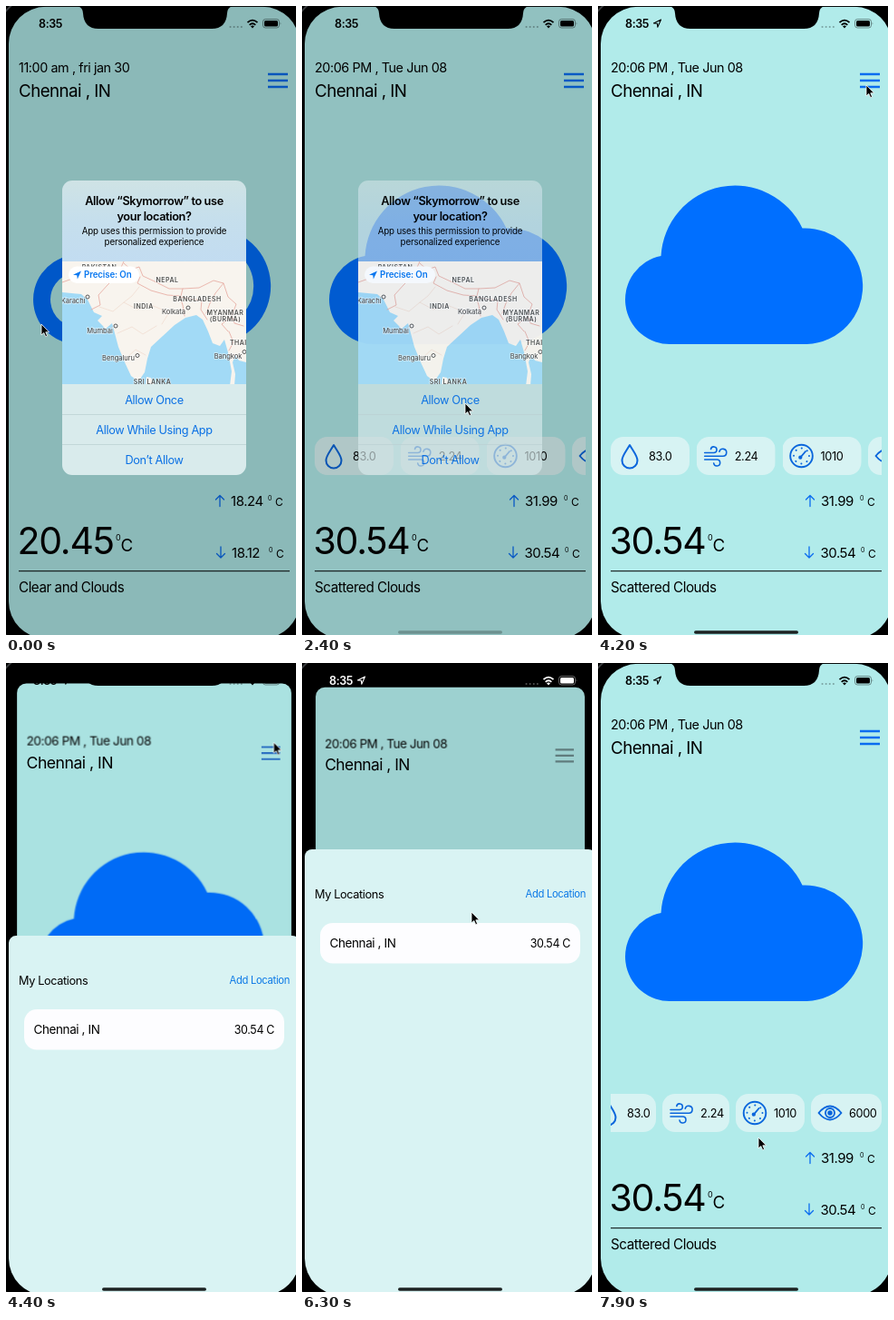
Write an HTML page that moves like this. It is 320 px wide and 692 px high and loops after 8000 ms.

```html
<!DOCTYPE html>
<html lang="en">
<head>
<meta charset="utf-8">
<title>Weather app</title>
<style>
html, body { margin: 0; width: 100%; height: 100%; overflow: hidden; background: #000; }
svg { display: block; width: 320px; height: 692px; }
text { font: 12.75px Inter, "Liberation Sans", sans-serif; letter-spacing: -.03em; white-space: pre; }
.mid text, .mid { text-anchor: middle; }
.end { text-anchor: end; }
.line { fill: none; stroke-linecap: round; stroke-linejoin: round; }
.date { font-size: 14.4px; }
.city { font-size: 18.75px; }
.temp { font-size: 41px; }
.deg { font-size: 9px; }
.range { font-size: 15px; }
.sky { font-size: 15.2px; }
.title { font-weight: 600; }
.note { font-size: 9.75px; letter-spacing: -.015em; }
.land { font-size: 7px; font-weight: 600; letter-spacing: .07em; fill: #50504e; }
.town { font-size: 7.6px; letter-spacing: -.01em; fill: #3c3c3c; }
.halo text { paint-order: stroke; stroke: #fff9; stroke-width: 1.5px; }

/* One shared 8 s clock */
.before, .after, .dim, .alert, .glass, .plain, .located, .bar, .home, .page, .shade, .menu, .sheet, .card, .card rect, .cursor {
  animation: 8s linear infinite;
}
.before { animation-name: before; animation-timing-function: step-end; }
.after { animation-name: after; animation-timing-function: step-end; }
@keyframes before { 0% { opacity: 1 } 11.25%, 100% { opacity: 0 } }
@keyframes after { 0% { opacity: 0 } 11.25%, 100% { opacity: 1 } }

.dim { animation-name: dim; }
@keyframes dim { 0%, 27.5% { opacity: .215 } 30% { opacity: .18 } 35%, 100% { opacity: 0 } }
.alert { animation-name: alert; }
@keyframes alert { 0%, 28.75% { opacity: 1 } 30% { opacity: .96 } 35%, 100% { opacity: 0 } }
.glass { animation-name: glass; }
@keyframes glass { 0%, 27.5% { opacity: 1 } 30% { opacity: .68 } 35%, 100% { opacity: .3 } }
.home { animation-name: home; }
@keyframes home { 0%, 27.5% { opacity: 0 } 30% { opacity: .3 } 35%, 100% { opacity: 1 } }

.plain { animation-name: plain; animation-timing-function: step-end; }
.located { animation-name: located; animation-timing-function: step-end; }
@keyframes plain { 0% { opacity: 1 } 37.5%, 100% { opacity: 0 } }
@keyframes located { 0% { opacity: 0 } 37.5%, 100% { opacity: 1 } }
.bar { color: #000; animation-name: bar; }
@keyframes bar { 0%, 56.5% { color: #000 } 58%, 82% { color: #fff } 83%, 100% { color: #000 } }

.sheet { animation-name: sheet; }
@keyframes sheet {
  0% { transform: translateY(660px) }
  53.75% { transform: translateY(660px); animation-timing-function: cubic-bezier(.2,.75,.3,1) }
  60% { transform: none }
  70% { transform: none; animation-timing-function: ease-in-out }
  78.75% { transform: translateY(161px) }
  79.5% { transform: translateY(161px); animation-timing-function: cubic-bezier(.3,.3,.3,1) }
  84.5%, 100% { transform: translateY(660px) }
}
.page { transform-origin: 163.5px 0; animation-name: page; }
@keyframes page {
  0% { transform: translateY(0) scale(1) }
  53.75% { transform: translateY(0) scale(1); animation-timing-function: cubic-bezier(.2,.75,.3,1) }
  60% { transform: translateY(35.6px) scale(.907) }
  70% { transform: translateY(35.6px) scale(.907); animation-timing-function: ease-in-out }
  78.75% { transform: translateY(26px) scale(.925) }
  79.5% { transform: translateY(26px) scale(.925); animation-timing-function: cubic-bezier(.3,.3,.3,1) }
  84.5%, 100% { transform: translateY(0) scale(1) }
}
.shade { animation-name: shade; }
@keyframes shade { 0%, 53.75% { opacity: 0 } 58%, 70% { opacity: .13 } 78.75%, 79.5% { opacity: .11 } 84.5%, 100% { opacity: 0 } }
.menu { stroke: #0a6cf0; animation-name: menu; }
@keyframes menu { 0%, 53.75% { stroke: #0a6cf0 } 57%, 80% { stroke: #6c8c8d } 84%, 100% { stroke: #0a6cf0 } }

.card { animation-name: slide; }
.card rect { width: 87px; animation-name: shrink; }
@keyframes slide {
  0% { transform: translateX(var(--from)) }
  90.5% { transform: translateX(var(--from)); animation-timing-function: ease-in-out }
  98.5%, 100% { transform: translateX(var(--to)) }
}
@keyframes shrink {
  0% { width: 87px }
  90.5% { width: 87px; animation-timing-function: ease-in-out }
  98.5%, 100% { width: var(--w) }
}

.cursor { animation-name: cursor; animation-timing-function: ease-in-out; }
@keyframes cursor {
  0%, 8% { transform: translate(39px, 350px) }
  25%, 33% { transform: translate(180px, 437px) }
  50%, 54.5% { transform: translate(296px, 87px) }
  61.25% { transform: translate(243px, 114px) }
  67%, 70% { transform: translate(187px, 113px) }
  78.75%, 79.5% { transform: translate(187px, 274px) }
  86.25%, 90.5% { transform: translate(223px, 509px) }
  98.5%, 100% { transform: translate(177px, 522px) }
}
</style>
</head>
<body>
<svg viewBox="0 0 320 692">
  <defs>
    <clipPath id="screen"><rect x="3" y=".8" width="321" height="695" rx="41"/></clipPath>
    <clipPath id="row"><rect x="14" y="466" width="299" height="58"/></clipPath>
    <clipPath id="box"><rect x="62" y="192" width="203" height="324" rx="11"/></clipPath>
    <clipPath id="map"><rect x="62" y="281" width="203" height="135"/></clipPath>
    <path id="cloud" d="M81.500 372A49 49 0 0 1 69.500 275A82 82 0 0 1 225.500 244.500A63.800 63.800 0 1 1 230.500 372Z"/>
    <clipPath id="inside"><use href="#cloud"/></clipPath>
    <linearGradient id="frost" x2="0" y2="1">
      <stop stop-color="#cfe3e5"/><stop offset=".45" stop-color="#c6dfec"/><stop offset="1" stop-color="#c2dcf1"/>
    </linearGradient>
    <path id="up" class="line" stroke="#0a6cf0" stroke-width="1.3" d="M0 6V-6M-4.5 -1.5L0 -6L4.5 -1.5"/>
  </defs>

  <rect width="320" height="692"/>
  <rect x="-13" y="-14" width="353" height="726" rx="55" fill="none" stroke="#3a3c3e" stroke-width="2"/>

  <g clip-path="url(#screen)">
    <rect width="324" height="696"/>
    <g class="page">
      <rect x="3" y=".8" width="321" height="696" rx="11" fill="#b1ebea"/>
      <path class="menu" fill="none" stroke-width="2.300" d="M289 75h22M289 82h22M289 89h22"/>
      <text class="city" x="14" y="100">Chennai , IN</text>
      <path d="M14 621.700H313" stroke="#000" stroke-width="1"/>
      <text class="city" x="126.500" y="600">C</text>
      <text class="deg" x="121" y="587.500">0</text>

      <g class="before">
        <use href="#cloud" clip-path="url(#inside)" fill="none" stroke="#006fff" stroke-width="38"/>
        <text class="date" x="14" y="73">11:00 am , fri jan 30</text>
        <text class="temp" x="12.500" y="603">20.45</text>
        <use href="#up" x="236" y="544.500"/>
        <text class="range" x="248" y="549.500">18.24</text>
        <use href="#up" transform="translate(237 601)rotate(180)"/>
        <text class="range" x="249" y="606.500">18.12</text>
        <text class="sky" x="14" y="645">Clear and Clouds</text>
      </g>

      <g class="after">
        <use href="#cloud" fill="#006fff"/>
        <text class="date" x="14" y="73">20:06 PM , Tue Jun 08</text>
        <text class="temp" x="12.500" y="603">30.54</text>
        <use href="#up" x="234" y="544.500"/>
        <text class="range" x="246" y="549.500">31.99</text>
        <use href="#up" transform="translate(233 601)rotate(180)"/>
        <text class="range" x="245.500" y="606.500">30.54</text>
        <text class="sky" x="14" y="645">Scattered Clouds</text>

        <g clip-path="url(#row)">
          <g class="card" style="--from:14px;--to:-10px;--w:74px">
            <rect y="474" height="42" rx="14" fill="#d7f3f3"/>
            <path class="line" stroke="#0a66dc" stroke-width="2" d="M21 483C17 490 12.500 495 12.500 500A8.500 8.500 0 0 0 29.500 500C29.500 495 25 490 21 483Z"/>
            <text x="42" y="499.500">83.0</text>
          </g>
          <g class="card" style="--from:108.700px;--to:71px;--w:74px">
            <rect y="474" height="42" rx="14" fill="#d7f3f3"/>
            <path class="line" stroke="#0a66dc" stroke-width="1.600" d="M9 491.500H19A3.300 3.300 0 1 0 15.800 487.500M9 495.300H29A4 4 0 1 0 25.200 490.300M9 499H22.500A3.500 3.500 0 1 1 19 503"/>
            <text x="42" y="499.500">2.24</text>
          </g>
          <g class="card" style="--from:203.500px;--to:152px;--w:76px">
            <rect y="474" height="42" rx="14" fill="#d7f3f3"/>
            <g class="line" stroke="#0a66dc" stroke-width="1.900">
              <circle cx="21" cy="495" r="12.300"/>
              <circle cx="21" cy="495" r="8.500" stroke-width="2" stroke-dasharray=".1 6.575"/>
              <path d="M20 496.500L25.500 490"/>
              <circle cx="19.800" cy="496.700" r="1.200"/>
            </g>
            <text x="42" y="499.500">1010</text>
          </g>
          <g class="card" style="--from:298px;--to:235px;--w:78px">
            <rect y="474" height="42" rx="14" fill="#d7f3f3"/>
            <g class="line" stroke="#0a66dc" stroke-width="1.900">
              <path d="M8.500 495Q21 480 33.500 495Q21 510 8.500 495Z"/>
              <circle cx="21" cy="495" r="5"/>
              <circle cx="21" cy="495" r="1.800" fill="#0a66dc"/>
            </g>
            <text x="42" y="499.500">6000</text>
          </g>
        </g>
      </g>

      <text x="289" y="544" style="font-size:7px">0</text>
      <text x="297" y="550" style="font-size:12px">C</text>
      <text x="290" y="601" style="font-size:7px">0</text>
      <text x="298" y="607" style="font-size:12px">C</text>
      <rect class="shade" x="3" y=".8" width="321" height="696" rx="11"/>
    </g>

    <g class="sheet">
      <rect x="3" y="44" width="321" height="700" rx="8" fill="#d9f3f3"/>
      <text x="14" y="97.500">My Locations</text>
      <text class="end" x="313" y="97" fill="#0a78e6" style="font-size:11.250px">Add Location</text>
      <rect x="20" y="125" width="287" height="44.500" rx="14" fill="#fdfdff"/>
      <text x="30.500" y="152" style="font-size:13.500px">Chennai , IN</text>
      <text class="end" x="296" y="152" style="font-size:12.500px">30.54 C</text>
    </g>

    <rect class="dim" width="324" height="696"/>
    <rect class="home" x="106" y="687.200" width="115" height="3.600" rx="1.800" fill="#1c2222"/>
  </g>

  <path d="M79 0Q85 2 85 8Q86 25 102 25H227Q243 25 244 8Q244 2 250 0Z"/>

  <g class="bar" fill="currentColor">
    <text class="plain title" x="36" y="24" style="font-size:12.500px">8:35</text>
    <g class="located">
      <text class="title" x="30" y="24" style="font-size:12.500px">8:35</text>
      <path class="line" stroke="currentColor" stroke-width="1.100" d="M69.500 15L61.500 18.900L65.400 19.300L65.800 23.300Z"/>
    </g>
    <path class="line" stroke="currentColor" stroke-width="2" opacity=".3" d="M247.500 23h.1M251.600 23h.1M255.700 23h.1M259.800 23h.1"/>
    <path fill="none" stroke="currentColor" stroke-width="1.800" d="M266.500 18.200Q272 13 277.500 18.200M268.700 20.800Q272 17.700 275.300 20.800"/>
    <path d="M270 22.300Q272 20.700 274 22.300L272 24.500Z"/>
    <rect x="283.500" y="14.500" width="18" height="9.500" rx="2.800" fill="none" stroke="currentColor" stroke-opacity=".4"/>
    <rect x="285" y="16" width="15" height="6.500" rx="1.500"/>
    <path d="M302.700 17.700q1.300 1.500 0 3Z" opacity=".5"/>
  </g>

  <g class="alert" clip-path="url(#box)">
    <g class="glass">
      <rect x="62" y="192" width="203" height="89" fill="url(#frost)"/>
      <rect x="62" y="416" width="203" height="100" fill="#d9ebec"/>
    </g>
    <g class="mid">
      <text class="title" x="163.500" y="219">Allow “Skymorrow” to use</text>
      <text class="title" x="163.500" y="235.500">your location?</text>
      <text class="note" x="163.500" y="250.500">App uses this permission to provide</text>
      <text class="note" x="163.500" y="262.500">personalized experience</text>
    </g>

    <g clip-path="url(#map)">
      <rect x="62" y="281" width="203" height="135" fill="#a2daf6"/>
      <path fill="#f8f4ee" d="M62 281H265V392L257 390L253 384L250 392L253 405L252 418H247L249 402L245 381L241 367L236 374L228 371L223 358L217 345L210 340L198 343L186 351L173 363L160 375L156 388L153 403L146 413L138 407L131 392L124 375L120 360L117 349L110 355L101 346L106 341L97 337L90 323L83 317L62 315ZM154 418L155 408L160 409L164 418Z"/>
      <g class="line" stroke="#e6a79d" stroke-width=".8">
        <path d="M94 334L104 329L102 318L112 307L123 296L130 281M130 283L138 290L147 287L151 297L164 303L180 311L195 311L213 310L229 302L240 305L231 316L225 327L221 338M148 298L145 305L160 313L178 318L193 319L195 311M197 341L195 329L192 320L202 322L216 324L215 334L222 345M240 305L245 320L254 328L249 341L252 349L262 352M245 358L238 350L247 343L256 346M246 379L251 370L246 358M62 304L76 299L88 300L96 291L108 286"/>
        <path stroke="#eed6c8" stroke-width=".6" d="M103 331L118 336L130 326L145 334L160 329L180 337M123 360L139 353L151 361L166 352M132 388L143 378L154 384M147 309L139 319L130 326M180 337L172 350"/>
      </g>
      <g class="mid halo">
        <text class="land" x="103" y="290">PAKISTAN</text>
        <text class="land" x="178" y="304">NEPAL</text>
        <text class="land" x="152" y="332.500">INDIA</text>
        <text class="land" x="211" y="324.500">BANGLADESH</text>
        <text class="land" x="242" y="339.500">MYANMAR</text>
        <text class="land" x="242" y="347">(BURMA)</text>
        <text class="land" x="267" y="372.500">THAILAND</text>
        <text class="land" x="161.500" y="415.500">SRI LANKA</text>
        <text class="town" x="74" y="327">Karachi</text>
        <text class="town" x="103.500" y="360">Mumbai</text>
        <text class="town" x="124" y="390">Bengaluru</text>
        <text class="town" x="185" y="339">Kolkata</text>
        <text class="town" x="245" y="387.500">Bangkok</text>
      </g>
      <g fill="#fff" stroke="#444" stroke-width=".9">
        <circle cx="90" cy="320" r="2"/><circle cx="121" cy="352" r="2"/><circle cx="145" cy="384.500" r="2"/>
        <circle cx="201" cy="332" r="2"/><circle cx="263" cy="380.500" r="2"/>
      </g>
      <rect x="69" y="286.500" width="78" height="18.500" rx="9.250" fill="#fff"/>
      <path fill="#0a78f0" d="M83 291.500L74 295.800L78.300 296.300L78.800 300.500Z"/>
      <text class="note title" x="86" y="299.200" fill="#0a78f0">Precise: On</text>
    </g>

    <path d="M62 449.500H265M62 482.500H265" stroke="#bdd2d3" stroke-width=".8"/>
    <g class="mid" fill="#0a70e4">
      <text x="163.500" y="437.500">Allow Once</text>
      <text x="163.500" y="471">Allow While Using App</text>
      <text x="163.500" y="504">Don’t Allow</text>
    </g>
  </g>

  <path class="cursor" d="M0 0V12L2.800 9.500L4.700 13.700L6.600 12.900L4.800 8.800H8.600Z" stroke="#fff" stroke-width=".8"/>
</svg>
</body>
</html>
```
